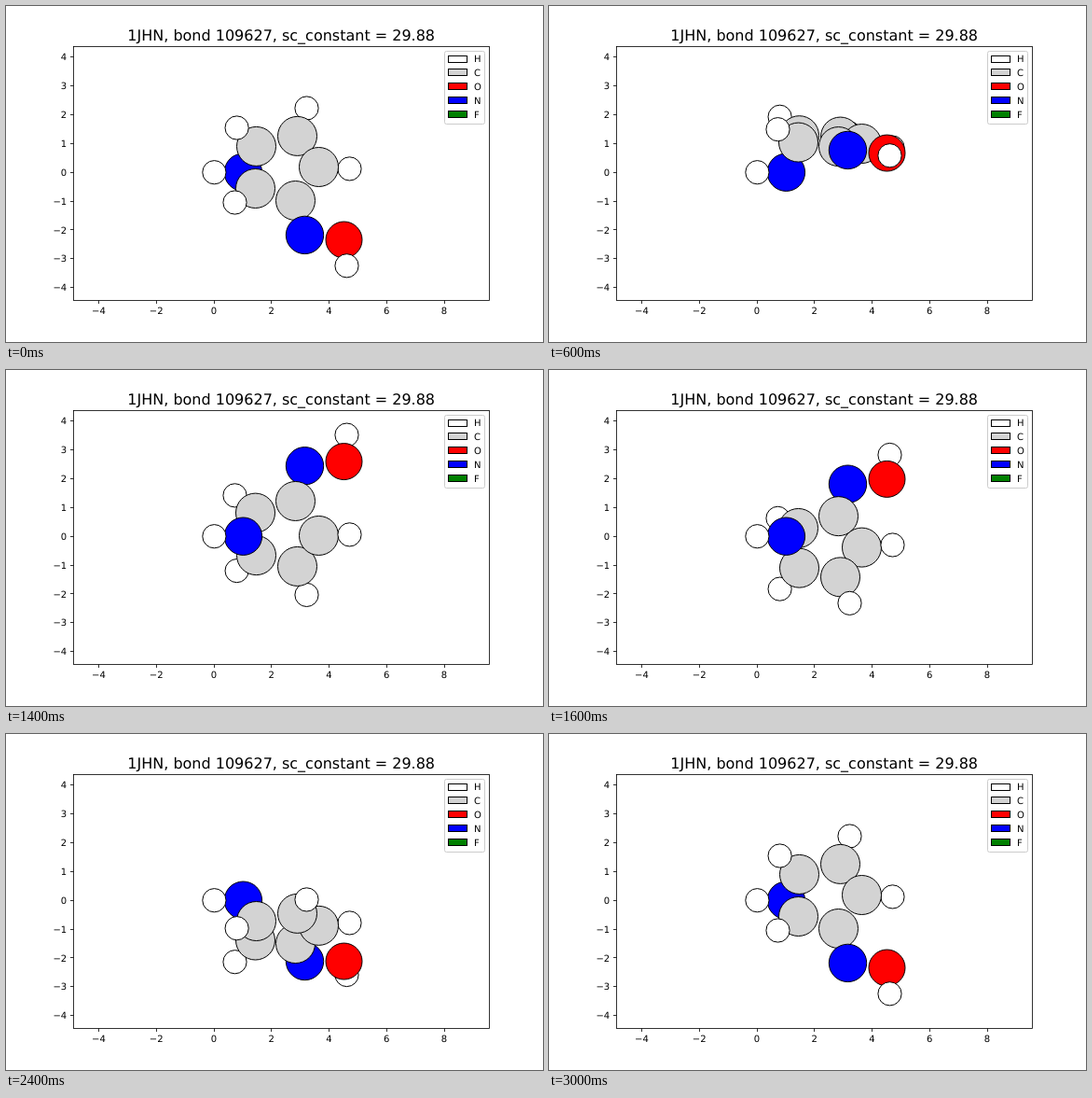
Animation of 576 by 360 pixels, one loop 3.2 s. Source, as an HTML page:

```html
<!DOCTYPE html>
<html lang="en">
<head>
<meta charset="utf-8">
<title>Bond rotation</title>
<style>
  html, body { margin: 0; width: 100%; height: 100%; overflow: hidden; background: #fff; }
  svg { display: block; width: 576px; height: 360px; }
  text { font: 10px "DejaVu Sans", sans-serif; fill: #000; text-rendering: geometricPrecision; }
  .title { font-size: 16px; text-anchor: middle; }
  .x { text-anchor: middle; }
  .y { text-anchor: end; }
  .axis { fill: none; stroke: #000; stroke-width: .8; }
  .shape { stroke: #000; stroke-width: 1; }
</style>
</head>
<body>
<svg viewBox="0 0 576 360">
  <g id="atoms"></g>
  <g id="axes">
    <rect class="axis" x="72.5" y="43.5" width="446" height="272"/>
    <text class="title" x="295.2" y="37">1JHN, bond 109627, sc_constant = 29.88</text>
  </g>
  <g id="legend">
    <rect x="470.5" y="48.5" width="43" height="78" rx="2" fill="#fff" fill-opacity=".8" stroke="#ccc"/>
  </g>
</svg>
<script>
const STEP = 200, STEPS = 16;
const UNIT = 30.88, X0 = 223, Y0 = 178.2;
const KINDS = {
  H: { color: '#fff', r: 12.6 },
  C: { color: '#d3d3d3', r: 21 },
  O: { color: '#f00', r: 19.5 },
  N: { color: '#00f', r: 20.2 },
  F: { color: '#008000' }
};

// kind, x, height below the axis, depth towards the viewer (px)
const atoms = [
  ['N', 254.4, 0, 0],
  ['H', 223.4, 0, 0],
  ['H', 247.6, -47.7, 47],
  ['C', 268.5, -27.8, 32.5],
  ['H', 245.5, 32.3, 58.9],
  ['C', 267.5, 17.3, 39.4],
  ['C', 312.5, -38.8, 27.5],
  ['H', 322.5, -68.7, 21.5],
  ['C', 335.5, -5.7, 30.4],
  ['H', 368.5, -3.8, 26.7],
  ['C', 310.5, 30.3, 38.9],
  ['N', 320.5, 67.2, 46.8],
  ['O', 362.5, 72.3, 45.2],
  ['H', 365.5, 100.1, 51.4]
];

const layer = id => document.getElementById(id);

function add(parent, tag, attrs, text) {
  const el = document.createElementNS('http://www.w3.org/2000/svg', tag);
  for (const k in attrs) el.setAttribute(k, attrs[k]);
  if (text !== undefined) el.textContent = text;
  return parent.appendChild(el);
}

const snap = v => Math.floor(v) + .5;
const label = v => String(v).replace('-', '\u2212');

const axes = layer('axes');
for (let v = -4; v <= 8; v += 2) {
  const x = X0 + v * UNIT;
  add(axes, 'path', { class: 'axis', d: `M${snap(x)} 315.5v3.5` });
  add(axes, 'text', { class: 'x', x, y: 330 }, label(v));
}
for (let v = -4; v <= 4; v++) {
  const y = Y0 - v * UNIT;
  add(axes, 'path', { class: 'axis', d: `M72.5 ${snap(y)}h-3.5` });
  add(axes, 'text', { class: 'y', x: 65.2, y: Math.round(y + 3.6) }, label(v));
}

const legend = layer('legend');
Object.keys(KINDS).forEach((kind, i) => {
  const y = 53 + i * 14.8;
  add(legend, 'rect', { class: 'shape', x: 474.5, y: snap(y), width: 20, height: 7, fill: KINDS[kind].color });
  add(legend, 'text', { x: 502, y: Math.round(y + 7.4) }, kind);
});

const stage = layer('atoms');
const balls = atoms.map(([kind, x, y, z]) => {
  const { color, r } = KINDS[kind];
  return { y, z, el: add(stage, 'circle', { class: 'shape', cx: x, r, fill: color }) };
});

// The first and last steps share the same pose.
function pose(step) {
  const a = 2 * Math.PI * step / (STEPS - 1);
  const c = Math.cos(a), s = Math.sin(a);
  const depth = b => b.z * c + b.y * s;
  for (const b of balls) b.el.setAttribute('cy', Y0 + b.y * c - b.z * s);
  [...balls].sort((p, q) => depth(p) - depth(q)).forEach(b => stage.appendChild(b.el));
}

const start = performance.now();
let shown = -1;
function tick() {
  const step = Math.floor((performance.now() - start) / STEP) % STEPS;
  if (step !== shown) pose(shown = step);
  requestAnimationFrame(tick);
}
tick();
</script>
</body>
</html>
```
